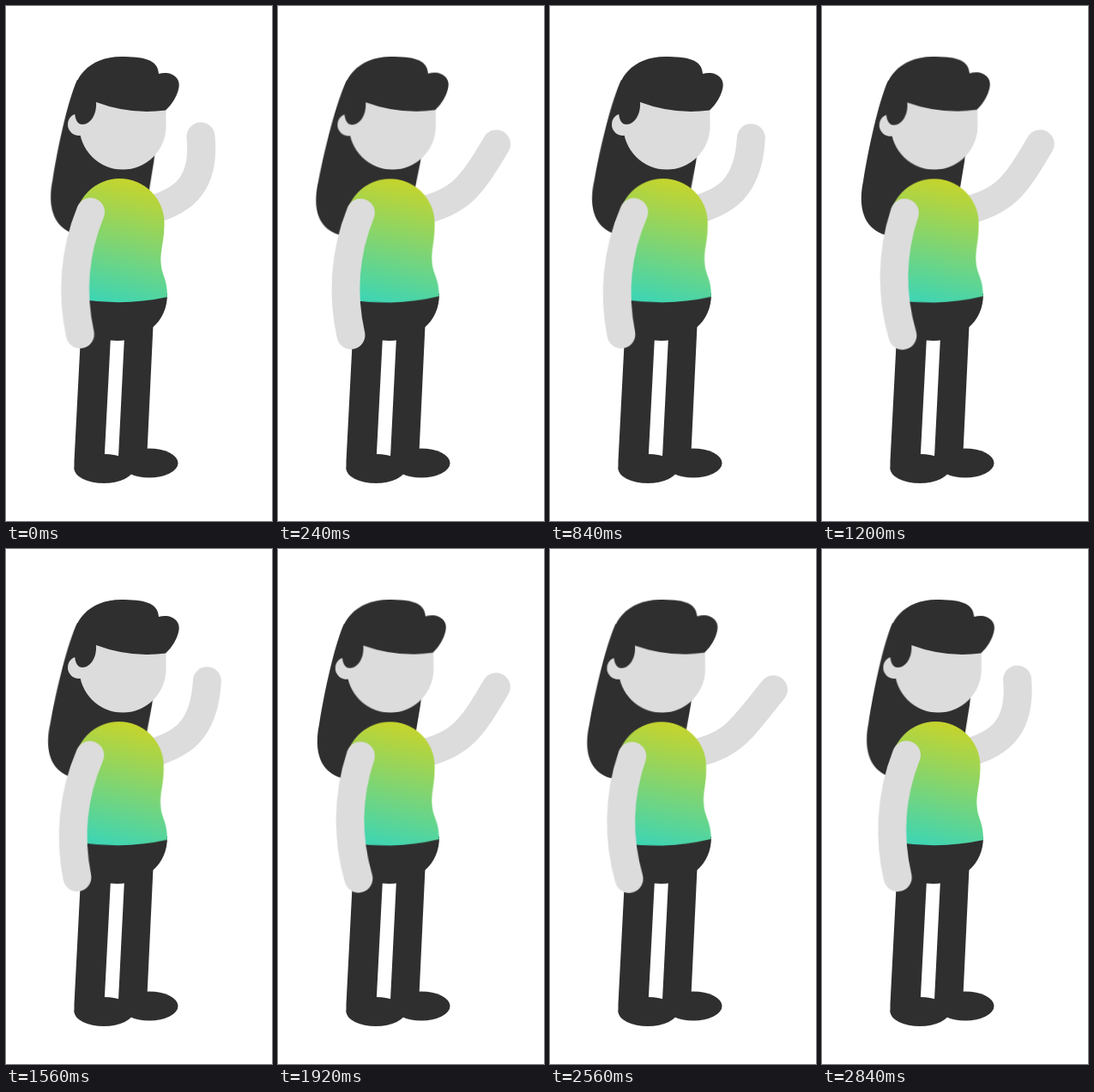
Animation, 310 px wide and 600 px high, one loop 2880 ms. Source, as an HTML page without scripts:

```html
<!DOCTYPE html>
<html lang="en">
<head>
<meta charset="utf-8">
<title>Waving figure</title>
<style>
  html, body { margin: 0; width: 100%; height: 100%; overflow: hidden; background: #fff; }
  svg { display: block; width: 310px; height: 600px; }

  .dark { fill: #2f2f2f; }
  .skin { fill: #dcdcdc; }
  .limb { fill: none; stroke: #dcdcdc; stroke-width: 33; stroke-linecap: round; }

  /* Each part swings there and back in 720 ms; delays set the overlap. */
  .sway { animation: 360ms cubic-bezier(.364, 0, .636, 1) infinite alternate; }
  .torso { animation-name: torso; transform-origin: 145px 345px; }
  .head { animation-name: head; animation-delay: -660ms; transform-origin: 136px 480px; }
  .hair { animation-name: hair; animation-delay: -70ms; transform-origin: 120px 90px; }
  .rest { animation-name: rest; animation-delay: -572ms; transform-origin: 98.5px 240px; }
  .wave { animation: wave 720ms infinite; }

  @keyframes torso { from { transform: rotate(0deg); } to { transform: rotate(-1.6deg); } }
  @keyframes head { from { transform: rotate(.07deg); } to { transform: rotate(-.94deg); } }
  @keyframes hair { from { transform: skewX(.4deg); } to { transform: skewX(-2.5deg); } }
  @keyframes rest { from { transform: rotate(1.8deg); } to { transform: rotate(-2.5deg); } }
  @keyframes wave {
    0%, 100% {
      d: path("M165 239 C200 229 233 214 227 152");
      animation-timing-function: cubic-bezier(.5, 0, .75, .5);
    }
    25% {
      d: path("M165 239 C207.5 229 228.5 212.5 244.7 156");
      animation-timing-function: cubic-bezier(.25, .5, .5, 1);
    }
    50% {
      d: path("M165 239 C215 228.5 222.5 209.5 261 164");
      animation-timing-function: cubic-bezier(.5, 0, .75, .5);
    }
    75% {
      d: path("M165 239 C207.5 229 228.5 212.5 244.7 156");
      animation-timing-function: cubic-bezier(.25, .5, .5, 1);
    }
  }
</style>
</head>
<body>
<svg viewBox="0 0 310 600">
  <defs>
    <linearGradient id="shirt" gradientUnits="userSpaceOnUse" x1="155" y1="203" x2="120" y2="345">
      <stop offset="0" stop-color="#c8d42a"/>
      <stop offset="1" stop-color="#3fd5b2"/>
    </linearGradient>
  </defs>

  <path class="limb wave" d="M165 239 C200 229 233 214 227 152"/>

  <g class="sway head">
    <path class="dark sway hair" d="M83 86 C72 110 60 165 54 203 C50 222 48 256 80 266
      L120 262 L164 232 L166 218 L172 182 L174 165 L150 100 Z"/>
    <circle class="skin" cx="85" cy="138" r="13"/>
    <path class="skin" d="M186.500 112 V140 A50.500 50.500 0 1 1 136 89.500 Z"/>
    <path class="dark" d="M80 112 C75 85 97 59 134 59 C160 59 177 62 178 79 C193 75 205 84 201 97
      C199 105 194 114 186 121.500 Q145 127 105 112 C106 127 98 138 89 138 C81 138 79 127 80 112 Z"/>
  </g>

  <g class="dark">
    <path d="M92 335 H188 C188 352 182 365 171 374.500 C158 387 140 391.500 121 389.500 L87 380 Z"/>
    <path d="M87.500 375 L122 385 L114.500 530 V540 H79.500 V530 Z"/>
    <path d="M138 385 L171.500 372 L164.500 520 V535 H130.500 Z"/>
    <ellipse cx="114" cy="539" rx="34.500" ry="17"/>
    <ellipse cx="167" cy="532.500" rx="33.500" ry="17"/>
  </g>

  <g class="sway torso">
    <path fill="url(#shirt)" d="M80.500 253 A52 52 0 0 1 184.500 253 C184.500 275 180 283 180.500 298
      C181 314 188 316 188 339 Q140 349.500 88 342 Z"/>
    <path class="limb sway rest" d="M98.500 240 C79 288 77 338 87 382.500"/>
  </g>
</svg>
</body>
</html>
```
